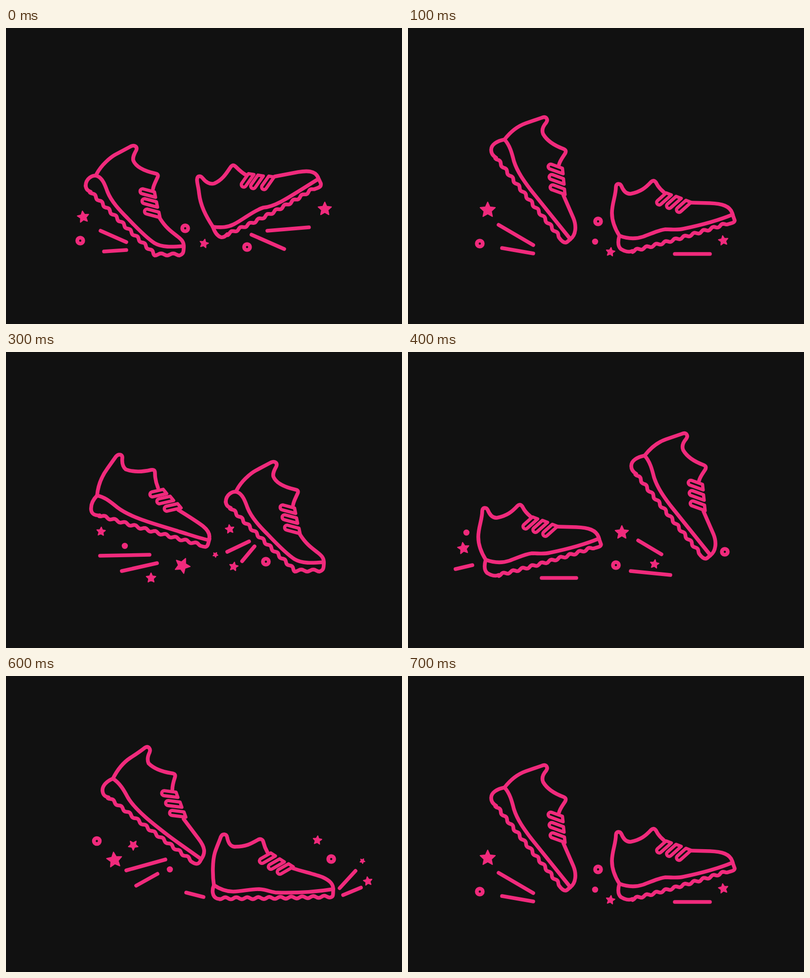
These frames come from a looping animation (800 px wide and 600 px high, 0.8 s). An HTML page:

```html
<!DOCTYPE html>
<html lang="en">
<head>
<meta charset="utf-8">
<title>Walking sneakers</title>
<style>
html, body { margin: 0; width: 100%; height: 100%; overflow: hidden; background: #111; }
svg { display: block; width: 100vw; height: 100vh; }
.line { fill: none; stroke: #f02a7c; stroke-width: 7.6; stroke-linecap: round; stroke-linejoin: round; }
.lace { stroke-width: 6.6; }
.solid { fill: #f02a7c; stroke: #f02a7c; stroke-width: 2; stroke-linejoin: round; }
</style>
</head>
<body>
<svg id="stage" viewBox="0 0 800 600"></svg>
<script>
const STEP = 100;
const ORDER = [0, 1, 2, 3, 4, 3, 2, 1];
const LACE = 'M-12 -5L12 -5L17 5L-11 5A5 5 0 0 1 -12 -5Z';

// Each sole is a heel curve, scalloped runs [x0, y0, x1, y1, waves, bend], and a toe curve.
const shoes = {
  push: {
    upper: 'M183 296C193 277 211 262 222 256L252 240C260 236 266 241 263 248C258 257 256 262 257 268C262 282 280 290 302 295C307 296 308 299 306 303C302 312 298 319 297 326M311 386C323 405 334 413 346 422C355 429 360 434 359 445',
    mid: 'M161 320C161 305 175 297 184 300C195 304 200 318 205 332C213 352 230 370 245 385C262 403 283 425 300 436C315 445 335 444 359 442',
    heel: 'M161 320C162 328 166 330 171 332',
    waves: [[171, 332, 301, 459, 9, 1], [301, 459, 350, 459, 2, 0]],
    toe: 'C357 459 359 456 359 445',
    laces: [[287, 334], [291, 354], [296, 375]], tilt: 15
  },
  lift: {
    upper: 'M195 226C208 209 224 198 238 193L270 182C279 178 284 185 279 192C272 200 270 208 273 215C281 229 295 238 314 245C319 247 320 250 317 255C311 264 307 269 305 277M314 339L334 385C341 402 339 420 328 428',
    mid: 'M195 226C206 238 210 254 214 270C221 292 235 311 247 327L328 428',
    heel: 'M195 226C180 229 168 236 168 247C168 256 173 260 178 263',
    waves: [[178, 263, 307, 424, 10, 1]],
    toe: 'C311 433 316 437 321 434L328 428',
    laces: [[299, 285], [301, 306], [303, 327]], tilt: 20
  },
  swing: {
    upper: 'M216 208C225 190 236 176 251 166C262 159 271 153 281 145C288 141 293 148 290 155C286 163 285 170 288 177C299 188 315 194 334 197C341 198 343 200 341 206C338 215 336 222 336 231M359 290L389 330C402 347 404 358 394 372',
    mid: 'M216 208C230 217 238 231 246 246C261 272 300 302 330 325C350 340 375 357 394 371',
    heel: 'M216 208C204 213 194 222 195 233C196 243 202 245 207 246',
    waves: [[207, 246, 375, 374, 10, 1]],
    toe: 'C381 381 389 385 394 372',
    laces: [[331, 239], [339, 259], [347, 279]], tilt: 7
  },
  reach: {
    upper: 'M184 291C186 268 194 251 205 236L222 212C228 205 236 208 235 215C234 225 236 233 242 238C258 244 276 243 293 239C299 238 301 240 301 246C301 258 303 265 307 275M348 320C370 334 385 343 398 353C409 362 413 371 410 380',
    mid: 'M184 291C200 294 211 304 225 315C255 338 310 351 350 364C370 370 390 377 408 381',
    heel: 'M184 291C176 299 171 309 172 320C173 329 181 332 189 331',
    waves: [[189, 331, 394, 391, 10, 1]],
    toe: 'C402 396 406 396 408 390L411 379',
    laces: [[307, 286], [321, 300], [336, 315]], tilt: -13
  },
  strike: {
    upper: 'M418 403C403 380 393 360 390 335C389 322 385 312 386 306C387 299 393 299 397 304C403 312 412 318 421 315C437 308 445 295 453 283C457 277 460 277 464 281C471 288 477 294 485 298M543 301L590 292C608 289 624 289 630 302',
    mid: 'M418 403C436 405 448 404 460 398C480 388 500 370 520 364C545 362 570 344 631 306',
    heel: 'M418 403C421 412 425 421 434 424C440 425 443 422 447 418',
    waves: [[447, 418, 624, 324, 10, 4]],
    toe: 'C634 323 637 321 636 315L630 302',
    laces: [[487, 308], [506, 311], [528, 313]], tilt: -55
  },
  land: {
    upper: 'M427 421C417 405 412 390 412 375C412 355 420 340 420 322C420 315 428 314 431 320C435 330 441 337 450 336C470 332 480 324 491 312C495 308 499 309 502 315C506 323 511 328 517 333M572 354L610 355C635 356 650 361 655 375',
    mid: 'M427 421C445 428 460 428 475 423C492 417 505 410 520 408C533 408 545 410 556 407C590 400 625 391 656 378',
    heel: 'M427 421C424 432 423 442 430 448C438 453 447 455 453 452',
    waves: [[453, 452, 645, 396, 10, 2]],
    toe: 'C652 396 660 395 660 390L655 376',
    laces: [[516, 346], [536, 353], [556, 361]], tilt: -42
  },
  flat: {
    upper: 'M420 424C417 404 417 375 422 358C425 348 431 335 434 326C437 319 446 319 447 328C449 338 454 347 464 346C485 346 495 340 509 332C514 329 519 331 520 337C522 345 524 350 528 357M580 390C602 397 625 402 640 408C655 415 661 422 661 432',
    mid: 'M420 424C435 434 447 437 459 437C478 436 495 432 512 432C528 433 537 439 548 439C590 440 630 437 661 432',
    heel: 'M420 424C416 433 416 447 426 451C429 452 430 452 432 452',
    waves: [[432, 450.5, 654, 447, 10, 1]],
    toe: 'C661 448 661 446 661 432',
    laces: [[527, 369], [545, 381], [563, 391]], tilt: -30
  }
};

// pair: [shoe, dx, dy]; stars: [x, y, radius, turn]
const poses = [
  {
    pair: [['push', 0, 0], ['strike', 0, 0]],
    stars: [[156, 383, 12, -8], [400, 437, 9, 12], [644, 367, 14, 0]],
    rings: [[150, 431], [362, 406], [487, 444]], dots: [],
    lines: ['M191 411L243 434', 'M198 453L243 450', 'M496 419L562 448', 'M528 411L612 404']
  },
  {
    pair: [['lift', 0, 0], ['land', 0, 0]],
    stars: [[161, 369, 16, 0], [409, 454, 9, 8], [637, 431, 10, -8]],
    rings: [[145, 437], [384, 392]], dots: [[378, 433]],
    lines: ['M183 399L253 440', 'M190 446L253 457', 'M539 458L610 458']
  },
  {
    pair: [['swing', 0, 0], ['flat', 0, 0]],
    stars: [[219, 373, 16, -7], [257, 343, 10, 36], [629, 333, 9, 6], [720, 375, 5, 30], [731, 416, 9, -8]],
    rings: [[183.5, 334.5], [657, 371]], dots: [[331, 392]],
    lines: ['M243 394L322 372', 'M263 425L306 401', 'M364 439L399 448', 'M674 430L706 395', 'M681 444L717 429']
  },
  {
    pair: [['reach', 0, 0], ['push', 283, -16]],
    stars: [[192, 364, 9, 4], [293, 458, 10, 0], [356, 433, 16, 25], [423, 411, 5, 30], [452, 359, 9, -8], [460, 435, 9, 10]],
    rings: [[525, 425]], dots: [[240, 393]],
    lines: ['M190 413L290 411', 'M234 444L305 428', 'M447 405L491 384', 'M477 424L502 394']
  },
  {
    pair: [['land', -270, 0], ['lift', 283, -16]],
    stars: [[112, 398, 12, -8], [432, 366, 14, 0], [498, 430, 9, 8]],
    rings: [[420, 432], [640, 405]], dots: [[118, 366]],
    lines: ['M96 440L130 432', 'M270 458L340 458', 'M465 382L512 410', 'M450 444L530 452']
  }
];

function scallops([x0, y0, x1, y1, count, bend]) {
  const dx = x1 - x0, dy = y1 - y0, len = Math.hypot(dx, dy);
  const steps = count * 10;
  let d = '';
  for (let i = 0; i <= steps; i++) {
    const t = i / steps;
    const off = 4 * bend * t * (1 - t) + 2.1 * (Math.cos(2 * Math.PI * count * t) - 1) + 2.1;
    d += `L${(x0 + dx * t - dy / len * off).toFixed(1)} ${(y0 + dy * t + dx / len * off).toFixed(1)}`;
  }
  return d;
}

const stroke = (d, extra = '') => `<path class="line" d="${d}" ${extra}/>`;

function shoe([name, dx, dy]) {
  const s = shoes[name];
  const laces = s.laces.map(([x, y]) =>
    `<path class="line lace" d="${LACE}" transform="translate(${x} ${y}) rotate(${s.tilt})"/>`).join('');
  const sole = s.heel + s.waves.map(scallops).join('') + s.toe;
  return `<g transform="translate(${dx} ${dy})">${stroke(s.upper)}${stroke(s.mid)}${stroke(sole)}${laces}</g>`;
}

function star([x, y, r, turn]) {
  let points = '';
  for (let i = 0; i < 10; i++) {
    const a = (turn - 90 + i * 36) * Math.PI / 180;
    const q = i % 2 ? r * 0.48 : r;
    points += `${(x + q * Math.cos(a)).toFixed(1)},${(y + q * Math.sin(a)).toFixed(1)} `;
  }
  return `<polygon class="solid" points="${points}"/>`;
}

const ring = ([x, y]) => `<circle class="line" cx="${x}" cy="${y}" r="6"/>`;
const dot = ([x, y]) => `<circle class="solid" cx="${x}" cy="${y}" r="5.2"/>`;

const stage = document.getElementById('stage');
stage.innerHTML = poses.map(p => '<g>' + [
  ...p.pair.map(shoe), ...p.stars.map(star), ...p.rings.map(ring),
  ...p.dots.map(dot), ...p.lines.map(d => stroke(d))
].join('') + '</g>').join('');
const groups = [...stage.children];

function show(ms) {
  const now = ORDER[Math.floor(ms / STEP) % ORDER.length];
  groups.forEach((g, i) => { g.style.display = i === now ? '' : 'none'; });
}

const start = performance.now();
function tick() {
  show(performance.now() - start);
  requestAnimationFrame(tick);
}
tick();
</script>
</body>
</html>
```
